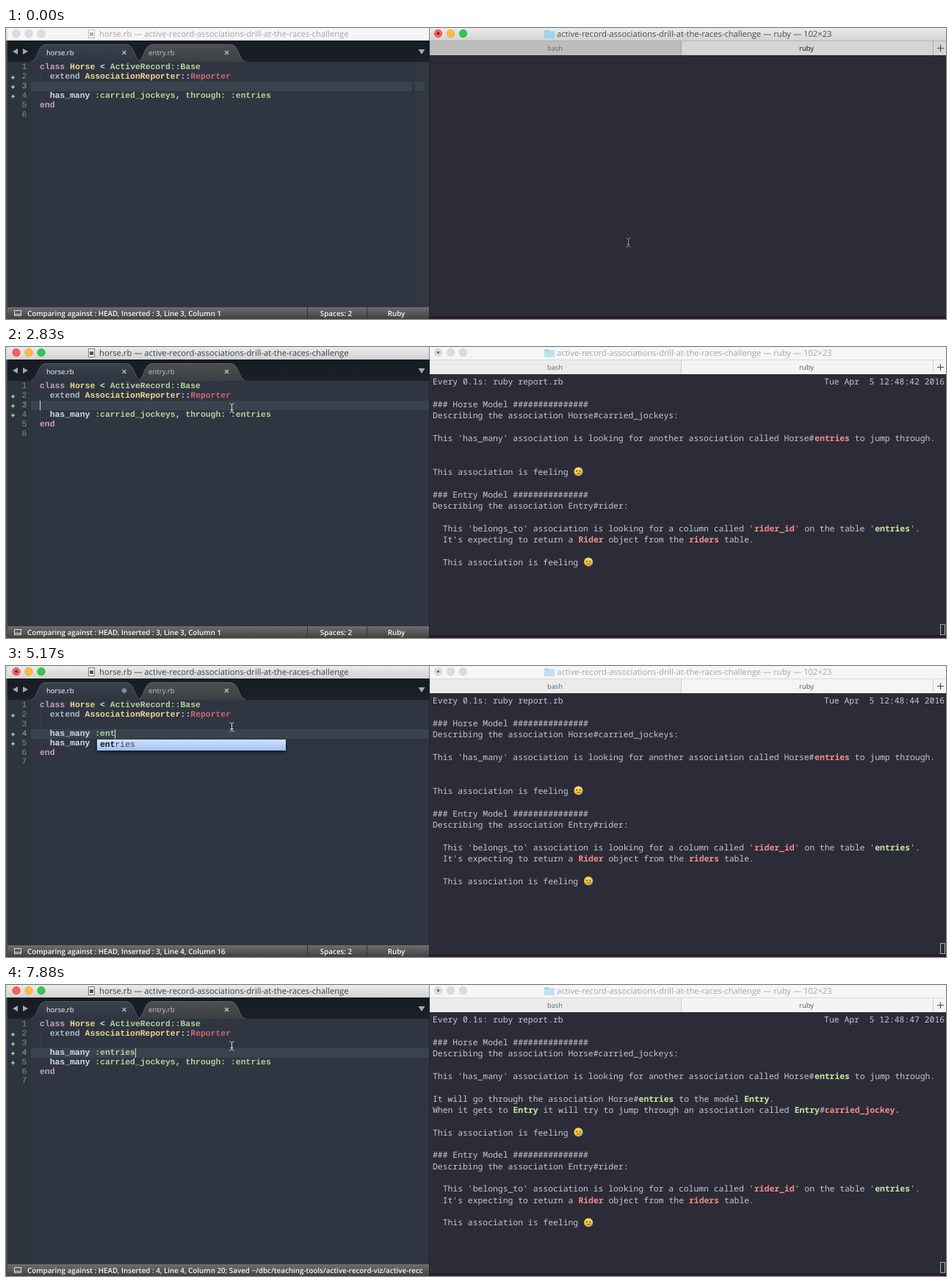
These frames come from a looping animation (1280x396 px, 8000 ms). An HTML page with a canvas:

```html
<!DOCTYPE html>
<html lang="en">
<head>
<meta charset="utf-8">
<title>Editor and terminal</title>
<style>
html, body { margin: 0; width: 100%; height: 100%; overflow: hidden; background: #2c2c38; }
canvas { display: block; width: 1280px; height: 396px; }
</style>
</head>
<body>
<canvas id="stage" width="1280" height="396"></canvas>
<script>
const c = document.getElementById('stage').getContext('2d');
const LOOP = 8000;
const CELL = 6.843, ROW = 15.36, LINE = 12.82;
const UI = '"Open Sans", sans-serif';
const TITLE = '11.23px ' + UI;
const CODE = 'bold 11.4px "Liberation Mono", monospace';
const TERM = '11.4px "Noto Sans Mono", monospace';
const PINK = '#c99dc2', YELLOW = '#f2d394', GREEN = '#b7cf9b', RED = '#cf656e', BLUE = '#a9b9ca', PLAIN = '#d5dae2';
const PAGE = '#2f3641', BAND = '#38434d';
const TYPED = 'has_many :entries';
const FOLDER = 'active-record-associations-drill-at-the-races-challenge';

// [time, value] steps
const keys = [[3540, 1], [3770, 2], [3890, 3], [4120, 4], [4350, 5], [4460, 6], [4580, 8], [4820, 10],
  [4940, 11], [5050, 12], [5170, 13], [5290, 14], [5400, 15], [5640, 16], [5880, 17]];
const seconds = [[0, 39], [1650, 40], [2830, 42], [3540, 43], [4820, 44], [6470, 45], [7770, 47]];
const dockTops = [[0, 396], [470, 392], [590, 387.5], [1070, 391], [1190, 396]];
const pointer = [[0, ['beam', 847, 292]], [360, ['hand', 848, 299]], [1190, ['beam', 800, 288]],
  [1300, ['beam', 700, 256]], [1420, ['beam', 600, 224]], [1530, ['resize', 519, 202]],
  [1760, ['beam', 526, 180]], [2000, ['beam', 340, 95]], [2230, ['beam', 312, 86]], [2470, ['beam', 307, 83]]];

function at(steps, t, start) {
  let v = start;
  for (const [time, value] of steps) if (t >= time) v = value;
  return v;
}

function rect(x, y, w, h, color) {
  c.fillStyle = color;
  c.fillRect(x, y, w, h);
}

function vgrad(y0, y1, a, b) {
  const g = c.createLinearGradient(0, y0, 0, y1);
  g.addColorStop(0, a);
  g.addColorStop(1, b);
  return g;
}

function text(s, x, y, font, color, align = 'left') {
  c.font = font;
  c.fillStyle = color;
  c.textAlign = align;
  c.fillText(s, x, y);
}

function dot(x, y, r, color, edge) {
  c.beginPath();
  c.arc(x, y, r, 0, 7);
  c.fillStyle = color;
  c.fill();
  if (edge) {
    c.lineWidth = 0.7;
    c.strokeStyle = edge;
    c.stroke();
  }
}

function shape(points, color) {
  c.beginPath();
  points.forEach(([x, y]) => c.lineTo(x, y));
  c.closePath();
  c.fillStyle = color;
  c.fill();
}

function line(x0, y0, x1, y1, color, w = 1) {
  c.beginPath();
  c.moveTo(x0, y0);
  c.lineTo(x1, y1);
  c.lineWidth = w;
  c.strokeStyle = color;
  c.stroke();
}

function cross(x, y, r, color) {
  line(x - r, y - r, x + r, y + r, color, 1.3);
  line(x - r, y + r, x + r, y - r, color, 1.3);
}

function plus(x, y, r, color, w) {
  line(x - r, y, x + r, y, color, w);
  line(x, y - r, x, y + r, color, w);
}

function titleBar(x, w, active, dirty) {
  rect(x, 0, w, 17, active ? vgrad(0, 17, '#ebebeb', '#d3d3d3') : '#f6f6f6');
  const lights = active
    ? [['#fc605b', '#dd4440'], ['#fdbc40', '#dd9d33'], ['#34c84a', '#27a934']]
    : Array(3).fill(['#dcdcdc', '#cbcbcb']);
  lights.forEach(([fill, edge], i) => dot(x + 12 + i * 17, 7.5, 5.2, fill, edge));
  if (dirty) dot(x + 12, 7.5, 1.8, active ? '#6b120f' : '#707070');
}

function tabShape(x0, x1, fill, edge) {
  c.beginPath();
  c.moveTo(x0, 46);
  c.bezierCurveTo(x0 + 10, 44, x0 + 8, 23, x0 + 20, 22.5);
  c.lineTo(x1 - 20, 22.5);
  c.bezierCurveTo(x1 - 8, 23, x1 - 10, 44, x1, 46);
  c.fillStyle = fill;
  c.fill();
  c.lineWidth = 1;
  c.strokeStyle = edge;
  c.stroke();
}

function codeLine(n, spans) {
  let x = 46;
  for (const [s, color] of spans) {
    text(s, x, lineY(n) + 9, CODE, color);
    x += s.length * CELL;
  }
}

const lineY = n => 47.4 + (n - 1) * LINE;

function popup(x, y, word, prefix) {
  c.save();
  c.shadowColor = 'rgba(0,0,0,.6)';
  c.shadowBlur = 5;
  c.shadowOffsetY = 2;
  rect(x, y, 257, 15, '#b9d2f6');
  c.restore();
  rect(x, y, 257, 15, vgrad(y, y + 15, '#cfe1fb', '#9fc0f1'));
  const head = word.slice(0, prefix);
  text(head, x + 4, y + 9.5, CODE, '#101418');
  text(word.slice(prefix), x + 4 + head.length * CELL, y + 9.5, CODE.replace('bold ', ''), '#3c434c');
}

function statusBar(t, lineNo, col, saved) {
  rect(2, 380, 574, 16, vgrad(380, 396, '#6d6d6d', '#414141'));
  c.lineWidth = 1;
  c.strokeStyle = '#dedede';
  c.strokeRect(11.5, 384.5, 9, 7);
  line(12, 389.5, 20, 389.5, '#dedede');
  const count = t >= 6830 ? 4 : 3;
  let msg = `Comparing against : HEAD, Inserted : ${count}, Line ${lineNo}, Column ${col}`;
  if (saved) msg += '; Saved ~/dbc/teaching-tools/active-record-viz/active-recc';
  const font = '600 9.8px ' + UI;
  c.save();
  c.beginPath();
  c.rect(0, 380, 574, 16);
  c.clip();
  text(msg, 29, 391.5, font, '#f8f8f8');
  c.restore();
  if (saved) return;
  for (const x of [410.5, 491.5]) line(x, 380, x, 396, '#333');
  text('Spaces: 2', 449.5, 391.5, font, '#f8f8f8', 'center');
  text('Ruby', 531.5, 391.5, font, '#f8f8f8', 'center');
  for (let i = 0; i < 3; i++) line(546 + i * 4, 391, 554 + i * 2, 383 + i * 3, '#555');
}

function editor(t) {
  const active = t >= 1420;
  const inserted = t >= 3060;
  const saved = t >= 6470;
  const dirty = inserted && !saved;
  const len = at(keys, t, 0);
  const atEnd = t >= 2000 && t < 2470;
  const lineNo = inserted || atEnd ? 4 : 3;
  const col = inserted ? 3 + len : atEnd ? 47 : 1;

  titleBar(2, 574, active, dirty);
  c.globalAlpha = active ? 1 : 0.45;
  c.lineWidth = 1;
  c.strokeStyle = '#777';
  rect(113, 2, 8, 11, '#fff');
  c.strokeRect(112.5, 2.5, 8, 11);
  rect(114, 6, 5, 5, '#555');
  c.globalAlpha = 1;
  text('horse.rb — ' + FOLDER, 127, 12, TITLE, active ? '#3f3f3f' : '#a6a6a6');

  rect(2, 17, 574, 29, vgrad(17, 46, '#171c23', '#1b2028'));
  rect(2, 46, 574, 334, PAGE);
  rect(2, 46, 32, 334, '#2d343e');
  if (!active) rect(557, 46, 19, 334, '#313842');
  shape([[16, 28], [16, 36], [9, 32]], '#a5a8ac');
  shape([[23, 28], [23, 36], [30, 32]], '#a5a8ac');
  shape([[561.5, 29], [570.5, 29], [566, 36]], '#a5a8ac');
  tabShape(179, 326, vgrad(22, 46, '#4c4e50', '#3d4043'), '#5e6163');
  tabShape(34, 184, vgrad(22, 46, '#3a424d', PAGE), '#4d5560');
  rect(2, 46, 32, 1, '#2d343e');
  rect(34, 46, 542, 1, PAGE);
  text('horse.rb', 55, 36.5, '9.5px ' + UI, '#fff');
  text('entry.rb', 194, 36.5, '9.7px ' + UI, '#c2c2c2');
  if (dirty) dot(161, 33.5, 3.3, '#858b94');
  else cross(161, 33.5, 2.5, '#b4b8bd');
  cross(300.5, 33.5, 2.5, '#c2c2c2');

  const bandY = Math.round(lineY(lineNo));
  rect(34, bandY, active ? 542 : 519, 13, BAND);
  if (!active) rect(557, bandY, 13, 13, BAND);
  const marks = t >= 6830 ? [2, 3, 4, 5] : inserted ? [2, 4, 5] : [2, 3, 4];
  for (let n = 1; n <= (inserted ? 7 : 6); n++) {
    text(n, 28.3, lineY(n) + 9, CODE.replace('bold ', ''), n === lineNo ? '#9aa2ac' : '#808995', 'right');
    if (marks.includes(n)) plus(9.5, lineY(n) + 7.2, 2.5, '#b5d197', 1.4);
  }
  for (let y = lineY(2); y < lineY(inserted ? 6 : 5); y += 2) rect(46, y, 1, 1, '#434b56');

  codeLine(1, [['class ', PINK], ['Horse ', YELLOW], ['< ', PLAIN], ['ActiveRecord::Base', GREEN]]);
  codeLine(2, [['  extend ', BLUE], ['AssociationReporter', YELLOW], ['::', PLAIN], ['Reporter', RED]]);
  let n = 4;
  if (inserted) {
    const s = TYPED.slice(0, len);
    codeLine(4, [['  ' + s.slice(0, 9), PLAIN], [s.slice(9), GREEN]]);
    n = 5;
  }
  codeLine(n, [['  has_many ', PLAIN], [':carried_jockeys', GREEN], [', ', PLAIN],
    ['through:', GREEN], [' ', PLAIN], [':entries', GREEN]]);
  codeLine(n + 1, [['end', PINK]]);

  const hidden = t < 2000 || (t >= 6360 && t < 6470) || (t >= 7410 && t < 7650);
  if (!hidden) {
    c.globalAlpha = (t >= 7300 && t < 7410) || (t >= 7650 && t < 7770) ? 0.5 : 1;
    rect(Math.floor(46 + (col - 1) * CELL), bandY, 1, 13, PLAIN);
    c.globalAlpha = 1;
  }
  if (len > 0 && len < 8) popup(56, 100, 'has_many', len);
  if (len > 10 && len < 17) popup(124, 100, 'entries', len - 10);
  statusBar(t, lineNo, col, saved);
}

function sadFace(x, y) {
  dot(x, y, 6, vgrad(y - 6, y + 6, '#ffe05a', '#f3ad2c'));
  dot(x - 2.2, y - 0.8, 1, '#664015');
  dot(x + 2.2, y - 0.8, 1, '#664015');
  c.beginPath();
  c.arc(x, y + 4.6, 2.2, Math.PI * 1.15, Math.PI * 1.85);
  c.lineWidth = 1;
  c.strokeStyle = '#664015';
  c.stroke();
  dot(x + 3, y + 3, 1.8, '#5fb4ea');
}

// [r ...] and [g ...] mark red and green words, @ is the face
function termLine(row, s) {
  const y = 47 + row * ROW;
  let x = 581;
  for (const part of s.split(/(\[[rg] [^\]]*\]|@)/)) {
    if (part === '@') {
      sadFace(x + 6.8, y - 0.3);
      continue;
    }
    const m = part.match(/^\[([rg]) (.*)\]$/);
    const word = m ? m[2] : part;
    const color = !m ? '#c3c6d0' : m[1] === 'r' ? '#f58a8a' : '#c8e6a0';
    text(word, x, y + 4, (m ? '600 ' : '500 ') + TERM, color);
    x += word.length * CELL;
  }
}

function terminal(t) {
  const active = t < 1420;
  rect(577, 17, 703, 375, '#2c2c38');
  titleBar(576.5, 704, active, true);
  c.globalAlpha = active ? 1 : 0.6;
  rect(733, 3, 6, 3, '#8ac6e2');
  rect(733, 4, 14, 10, '#9dd3ec');
  c.globalAlpha = 1;
  text(FOLDER + ' — ruby — 102×23', 750, 12, TITLE, active ? '#4a4a4a' : '#a6a6a6');
  rect(577, 17, 343, 20, active ? '#bdbdbd' : '#ebebeb');
  rect(920, 17, 360, 20, active ? '#d5d5d5' : '#f4f4f4');
  const rule = active ? '#a9a9a9' : '#d0d0d0';
  rect(577, 17, 703, 0.7, rule);
  rect(919, 17, 1, 20, rule);
  rect(1262, 17, 1, 20, rule);
  text('bash', 747.5, 31, '9.2px ' + UI, '#666', 'center');
  text('ruby', 1090, 31, '9.4px ' + UI, active ? '#111' : '#555', 'center');
  plus(1272.5, 27.5, 4.5, '#555', 1.2);

  if (t < 360) return;
  const stamp = `Tue Apr  5 12:48:${at(seconds, t)} 2016`;
  const first = 'Every 0.1s: ruby report.rb';
  const found = t >= 7770;
  termLine(0, first + stamp.padStart(102 - first.length));
  termLine(2, '### Horse Model ###############');
  termLine(3, 'Describing the association Horse#carried_jockeys:');
  termLine(5, `This 'has_many' association is looking for another association called Horse#[${found ? 'g' : 'r'} entries] to jump through.`);
  if (found) {
    termLine(7, 'It will go through the association Horse#[g entries] to the model [g Entry].');
    termLine(8, 'When it gets to [g Entry] it will try to jump through an association called [g Entry]#[r carried_jockey.]');
  }
  const r = found ? 10 : 8;
  termLine(r, 'This association is feeling @');
  termLine(r + 2, '### Entry Model ###############');
  termLine(r + 3, 'Describing the association Entry#rider:');
  termLine(r + 5, "  This 'belongs_to' association is looking for a column called '[r rider_id]' on the table '[g entries]'.");
  termLine(r + 6, "  It's expecting to return a [r Rider] object from the [r riders] table.");
  termLine(r + 8, '  This association is feeling @');
  if (!active) {
    c.lineWidth = 1;
    c.strokeStyle = '#a9acb6';
    c.strokeRect(1272.5, 377.5, 6, 14);
  }
}

function drawPointer(t) {
  const [kind, x, y] = at(pointer, t);
  if (kind === 'beam') {
    const color = t < 360 ? '#8d8d97' : '#d9dce0';
    line(x + 0.5, y - 5, x + 0.5, y + 5, color);
    for (const s of [-1, 1]) {
      line(x + 0.5, y + s * 4.5, x - 2.5, y + s * 6.5, color);
      line(x + 0.5, y + s * 4.5, x + 3.5, y + s * 6.5, color);
    }
    line(x - 1.5, y + 2.5, x + 2.5, y + 2.5, color);
  } else if (kind === 'resize') {
    const arrow = [[-7, 0], [-3, -4], [-3, -1.5], [3, -1.5], [3, -4], [7, 0], [3, 4], [3, 1.5], [-3, 1.5], [-3, 4]];
    shape(arrow.map(([dx, dy]) => [x + dx, y + dy]), '#fff');
    shape(arrow.map(([dx, dy]) => [x + dx * 0.75, y + dy * 0.55]), '#111');
  } else {
    const hand = [[-3, -6], [-1, -6], [0, -2], [4, -1], [5, 1], [4, 6], [-1, 6], [-5, 1], [-4, 0], [-2, 1]];
    shape(hand.map(([dx, dy]) => [x + dx, y + dy]), '#fff');
    for (const dx of [0, 2]) line(x + dx, y + 1, x + dx, y + 4, '#333', 0.8);
  }
}

function dock(t) {
  const top = at(dockTops, t);
  if (top >= 396) return;
  c.beginPath();
  c.moveTo(231, 396);
  c.quadraticCurveTo(234, top, 244, top);
  c.lineTo(1280, top);
  c.lineTo(1280, 396);
  c.fillStyle = '#f5f5f5';
  c.fill();
}

function draw(t) {
  rect(0, 0, 1280, 396, '#2b1c30');
  rect(0, 0, 2, 396, '#4a4e57');
  rect(0, 0, 2, 17, '#d9d9d9');
  editor(t);
  terminal(t);
  rect(576, 17, 1, 379, '#1f232b');
  dock(t);
  drawPointer(t);
}

c.textRendering = 'geometricPrecision';
const begin = performance.now();
function frame() {
  draw((performance.now() - begin) % LOOP);
  requestAnimationFrame(frame);
}
frame();
</script>
</body>
</html>
```
